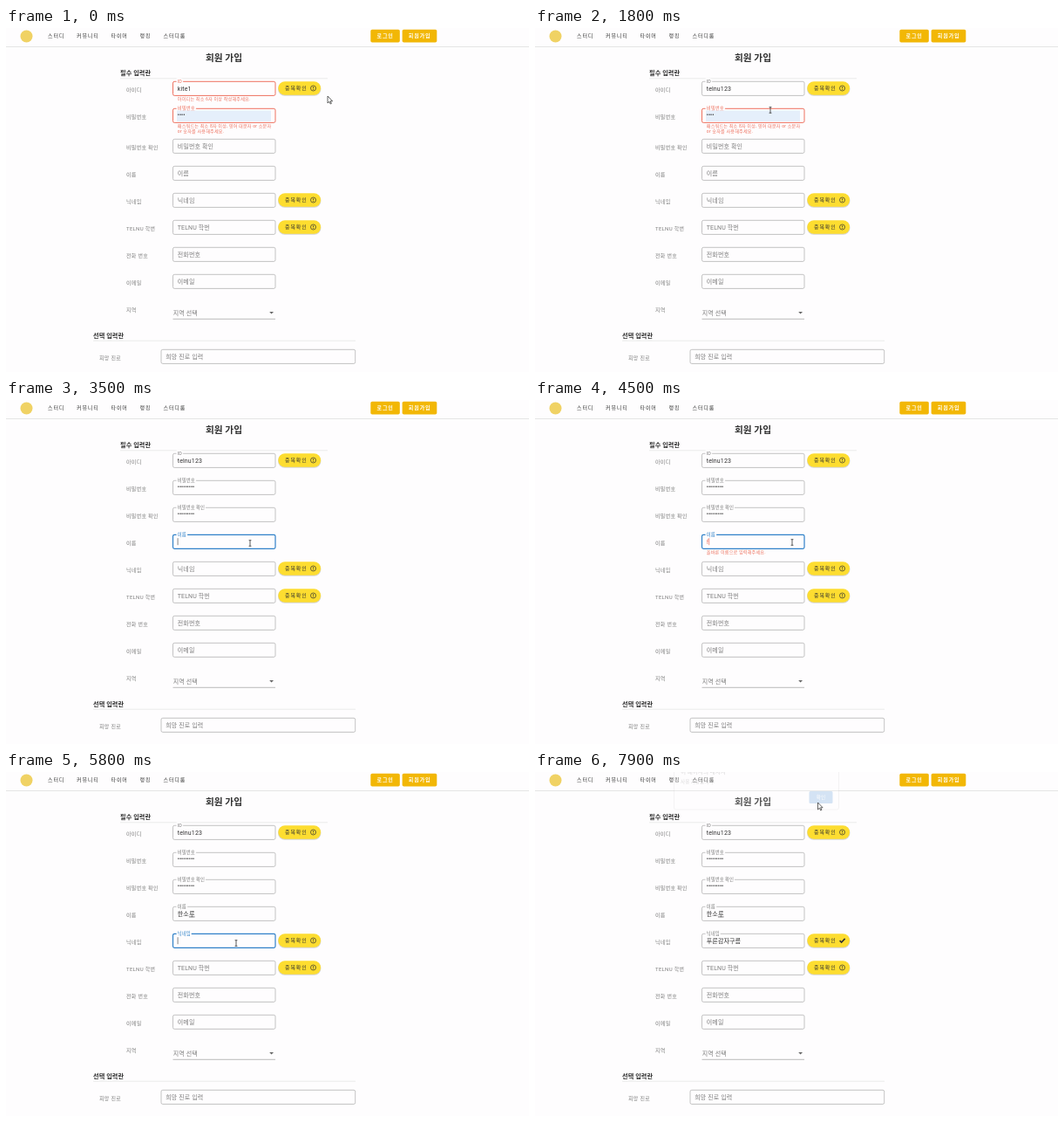
These frames come from a looping animation (600x394 px, 8 s). An HTML page:

```html
<!DOCTYPE html>
<html lang="ko">
<head>
<meta charset="utf-8">
<style>
html, body { margin: 0; width: 100%; height: 100%; overflow: hidden; background: #fefdfe; }
svg { display: block; width: 600px; height: 394px; }
text { font-family: Roboto, 'Noto Sans CJK KR', 'Noto Sans CJK', sans-serif; white-space: pre; }
</style>
</head>
<body>
<svg id="stage" viewBox="0 0 600 394"></svg>
<script>
const LOOP = 8000, TICK = 100;
const BG = '#fefdfe', RED = '#ee705e', BLUE = '#2f80c8', GREY = '#7c7c7c', INK = '#303030';
const stage = document.getElementById('stage');

const text = (x, y, size, str, fill = GREY, extra = '') =>
  `<text x="${x}" y="${y}" font-size="${size}" fill="${fill}" ${extra}>${str}</text>`;
const rect = (x, y, w, h, fill, extra = '') =>
  `<rect x="${x}" y="${y}" width="${w}" height="${h}" fill="${fill}" ${extra}/>`;
const rule = (x1, x2, y, color) =>
  `<path d="M${x1} ${y}H${x2}" stroke="${color}" stroke-width=".8"/>`;
const spaced = (n, weight = 400) => `letter-spacing="${n}" font-weight="${weight}"`;
const dots = n => '•'.repeat(n);

// Value of the latest step whose time has come
const step = (t, steps) => steps.reduce((v, s) => t >= s[0] ? s[1] : v, '');
const typing = (t, start, gap, stages) =>
  step(t, stages.map((s, i) => [start + i * gap, s]));

function field(y, label, o = {}) {
  const { x = 191.5, w = 117.5, value = '', focus, error, composing, secret, ink = INK } = o;
  const tone = error && !focus || error && secret ? RED : focus ? BLUE : '#b4b4b4';
  const raised = focus || value;
  let out = rect(x, y - 7.7, w, 16.1, 'none',
    `rx="1.8" stroke="${tone}" stroke-width="${focus ? 1.2 : error ? 1 : .8}"`);
  if (!raised) return out + text(x + 5.3, y + 2.6, 7, label, GREY, spaced(.12));
  out += text(x + 5.3, y - 6, 5.4, label, focus || error ? tone : GREY,
    `stroke="${BG}" stroke-width="3.4" paint-order="stroke"`);
  if (o.autofill) out += rect(196, y - 5.5, 108, 12.5, '#e5effb');
  if (o.selected) out += rect(196.7, y - 4.2, 15.6, 8.8, '#2f80e8');
  if (secret) return out + text(x + 5.3, y + 2.3, 6.4, value, o.selected ? '#fff' : INK);
  const shown = composing && value
    ? value.slice(0, -1) + `<tspan text-decoration="underline">${value.slice(-1)}</tspan>` : value;
  out += text(x + 5.3, y + 2.6, 7, shown, ink, spaced(.12));
  if (focus && !composing)
    out += `<path d="M${x + 5.6 + value.length * 2.6} ${y - 3.8}v8" stroke="${value ? RED : '#555'}" stroke-width=".7"/>`;
  return out;
}

function checkButton(y, done) {
  const icon = done
    ? `<path d="M349.6 ${y + .1}l2 2 4-4.2" fill="none" stroke="${INK}" stroke-width="1.6"/>`
    : `<circle cx="352.5" cy="${y}" r="3" fill="none" stroke="${INK}" stroke-width=".7"/>
       <path d="M352.5 ${y - 1.7}v2m0 .7v.8" stroke="${INK}" stroke-width=".8"/>`;
  return rect(312, y - 7, 49.4, 15.8, '#000', 'rx="7.8" opacity=".16"') +
    rect(312.3, y - 7.8, 48.8, 15.5, '#fddd30', 'rx="7.7"') +
    text(320, y + 2.2, 6, '중복확인', INK, spaced(.9, 500)) + icon;
}

function header() {
  const nav = [[48, '스터디'], [81, '커뮤니티'], [120.5, '타이머'], [153.5, '랭킹'], [180.5, '스터디룸']];
  return rect(0, 0, 600, 21.5, BG) + rule(0, 600, 21.5, '#e0e0e0') +
    '<circle cx="23.5" cy="9.5" r="7" fill="#f0d264"/>' +
    nav.map(([x, s]) => text(x, 11.4, 6, s, '#333', spaced(.9, 500))).join('') +
    [[418.3, 33.5, '로그인'], [454.6, 39.7, '회원가입']].map(([x, w, s]) =>
      rect(x, 1.8, w, 14.8, '#f2b705', 'rx="1.8"') +
      text(x + 7.2, 11.4, 6, s, '#fff', spaced(.9, 700))).join('');
}

function section(x, end, y, title) {
  return text(x, y, 7.2, title, INK, spaced(.05, 700)) + rule(x, end, y + 3.6, '#e6e6e6');
}

function form(t) {
  const drop = t < 2000 ? 4 : 0;      // the two-line password error pushes the rows down
  const rows = [131, 162, 193, 224, 255, 286].map(y => y + drop);
  const [confirmY, nameY, nickY, numberY, phoneY, mailY] = rows;
  const label = (y, s, x = 138) => text(x, y + 4.1, 6, s, GREY, spaced(.3));

  const id = step(t, [[0, 'kite1'], [1500, 't'], [1600, 'teln'], [1700, 'telnu1'], [1800, 'telnu123']]);
  const idError = t < 1700;
  const password = dots(step(t, [[0, 4], [1900, 6], [2000, 9]]));
  const confirm = dots(step(t, [[0, 0], [2200, 3], [2300, 7], [2700, 0], [2800, 3], [2900, 6], [3000, 9]]));
  const confirmError = t >= 2200 && t < 3000;
  const name = step(t, [[4500, 'f'], [4600, ''], [4700, 'ㅎ'], [4800, '하'], [4900, '한'],
    [5000, '한ㅅ'], [5100, '한소'], [5200, '한소ㄹ'], [5300, '한소루']]);
  const nameError = t >= 4500 && t < 5000;
  const nick = typing(t, 6300, 70, ['푸', '푸르', '푸른', '푸른가', '푸른감', '푸른감자',
    '푸른감자구', '푸른감자구르', '푸른감자구름']);
  const note = (y, s) => text(196.8, y, 5.1, s, RED, spaced(.2));

  let out = text(229, 37.8, 10.7, '회원 가입', INK, 'font-weight="700"') +
    section(131, 369, 54.2, '필수 입력란') +
    section(100, 401, 350.6 + drop, '선택 입력란');

  out += label(69, '아이디') + label(100, '비밀번호');
  ['비밀번호 확인', '이름', '닉네임', 'TELNU 학번', '전화 번호', '이메일'].forEach((s, i) => out += label(rows[i], s));
  out += label(317 + drop, '지역') + label(372 + drop, '희망 진로', 107);

  out += field(69, 'ID', { value: id, error: idError }) +
    field(100, '비밀번호', { value: password, error: drop, secret: true, autofill: drop }) +
    field(confirmY, '비밀번호 확인', {
      value: confirm, secret: true, error: confirmError,
      focus: t >= 2100 && t < 3400, selected: t >= 2500 && t < 2700
    }) +
    field(nameY, '이름', {
      value: name, error: nameError, focus: t >= 3400 && t < 5700,
      composing: t >= 4700, ink: name === 'f' ? RED : INK
    }) +
    field(nickY, '닉네임', { value: nick, focus: t >= 5700 && t < 7400, composing: t >= 6300 && t < 7400 }) +
    field(numberY, 'TELNU 학번') + field(phoneY, '전화번호') + field(mailY, '이메일') +
    field(372 + drop, '희망 진로 입력', { x: 178, w: 222.7 });

  if (idError) out += note(83.4, '아이디는 최소 6자 이상 작성해주세요.');
  if (drop) out += note(114.4, '패스워드는 최소 8자 이상, 영어 대문자 or 소문자') + note(119.5, 'or 숫자를 사용해주세요.');
  if (confirmError) out += note(confirmY + 14.2, '입력한 패스워드와 일치하지 않습니다.');
  if (nameError) out += note(nameY + 14.2, '올바른 이름으로 입력해주세요.');

  const selectY = 322 + drop;
  out += text(191.8, selectY + 2.5, 7, '지역 선택', GREY, spaced(.12)) +
    rule(191.5, 309, selectY + 7.3, '#aaa') +
    `<path d="M302.2 ${selectY - 1}h4.8l-2.4 2.4z" fill="#666"/>`;
  return out + checkButton(69) + checkButton(nickY, t >= 7900) + checkButton(numberY);
}

function alertBox(t) {
  const alpha = step(t, [[0, 0], [7500, .4], [7600, 1], [7900, .18]]);
  if (!alpha) return '';
  return `<g opacity="${alpha}">` +
    rect(159.5, -6, 189, 49, '#fff', 'rx="2" stroke="#bbb" stroke-width=".8"') +
    text(167, 2, 6.6, '이 페이지의 메시지', INK, 'font-weight="500"') +
    text(167, 13, 5.6, '사용 가능합니다.', '#444') +
    rect(314.5, 22, 27, 14, '#1a73c8', 'rx="1.5"') +
    text(322.8, 31, 5.6, '확인', '#fff') + '</g>';
}

// time, x, y, shape
const path = [
  [0, 369, 78, 'arrow'], [700, 369, 78, ''], [1200, 583, 310, 'arrow'], [1400, 270, 70, 'beam'],
  [1900, 270, 100, 'beam'], [2100, 250, 131, 'beam'], [2300, 214, 131, 'beam'], [2400, 160, 129, 'arrow'],
  [2500, 104, 127, 'arrow'], [2900, 104, 127, 'arrow'], [3300, 260, 163, 'beam'], [3700, 300, 165, 'arrow'],
  [4000, 592, 264, 'arrow'], [4100, 592, 264, 'arrow'], [4400, 295, 163, 'beam'], [5400, 295, 163, 'beam'],
  [5700, 264, 196, 'beam'], [7100, 264, 196, 'beam'], [7200, 300, 194, 'arrow'], [7300, 336, 194, 'arrow'],
  [7500, 336, 194, 'arrow'], [7700, 324.5, 35, 'arrow'], [8000, 324.5, 35, 'arrow']
];
const shapes = {
  arrow: '<path d="M0 0v8l1.9-1.7 1.3 2.7 1.2-.6-1.3-2.6h2.5z" fill="#fff" stroke="#222" stroke-width=".7"/>',
  beam: '<path d="M-1.4-3.3h2.8M0-3.3v6.6M-1.4 3.3h2.8" stroke="#333" stroke-width=".8"/>'
};
function pointer(t) {
  const i = path.findLastIndex(p => p[0] <= t);
  const [t0, x0, y0, shape] = path[i], [t1, x1, y1] = path[i + 1];
  const k = (t - t0) / (t1 - t0);
  return shape && `<g transform="translate(${x0 + (x1 - x0) * k} ${y0 + (y1 - y0) * k})">${shapes[shape]}</g>`;
}

let shown = -1;
const start = performance.now();
function draw() {
  const t = Math.floor((performance.now() - start) % LOOP / TICK) * TICK;
  if (t !== shown) stage.innerHTML = header() + form(t) + alertBox(t) + pointer(t);
  shown = t;
  requestAnimationFrame(draw);
}
draw();
</script>
</body>
</html>
```
